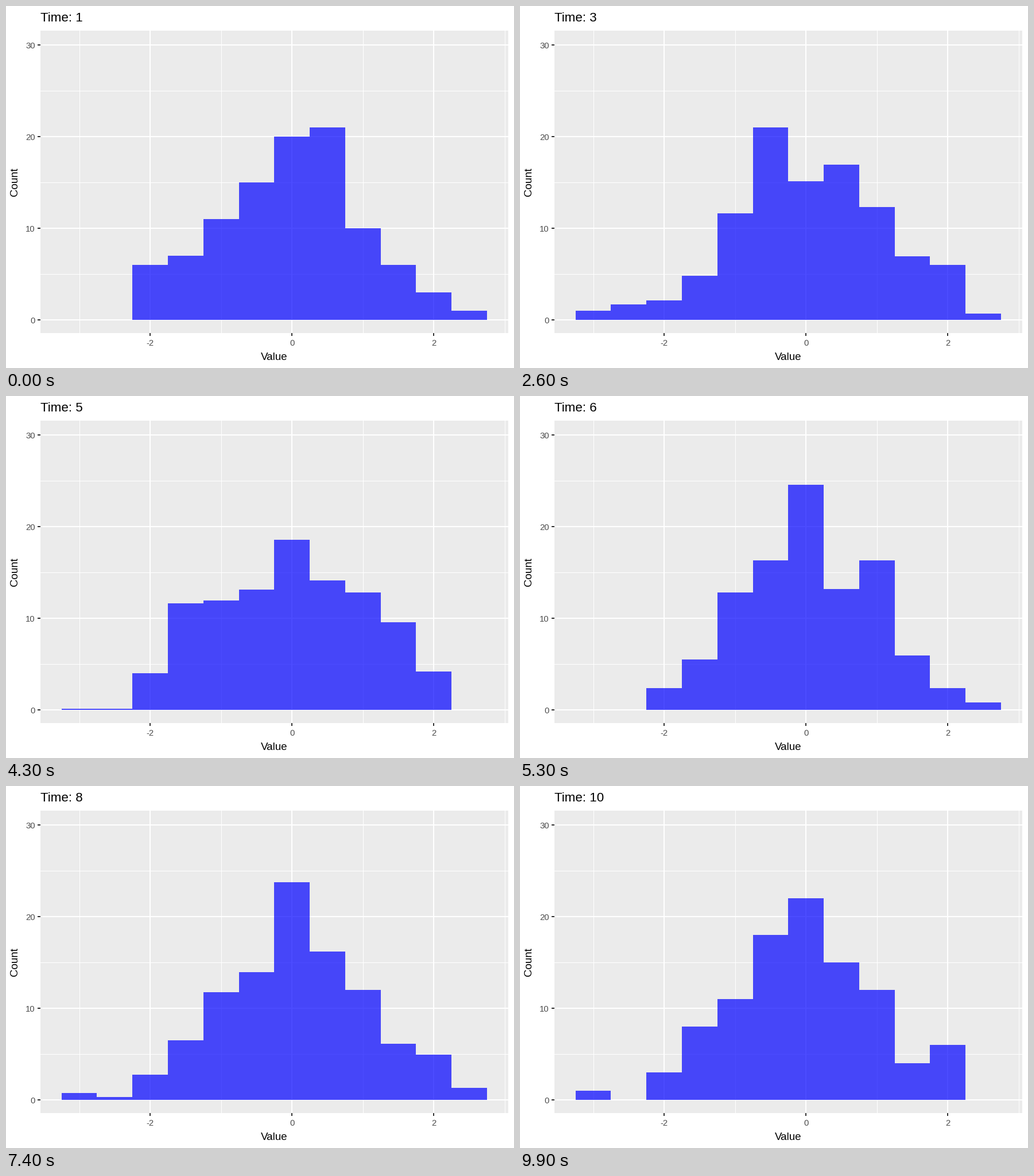
A matplotlib script that plays this animation: 885 by 632 pixels, repeating every 10000 ms.

```python
import numpy as np
import matplotlib.pyplot as plt
from matplotlib.animation import FuncAnimation
from matplotlib.patches import Rectangle

W, H, DPI = 885, 632, 64
LEFT, TOP, RIGHT, BOTTOM = 60, 43, 875, 571
STEPS = 11  # frames between two samples
FRAMES = 100

# Histogram counts at times 1..10, bins centred on -3, -2.5, ..., 2.5
COUNTS = np.array([
    [0, 0, 6, 7, 11, 15, 20, 21, 10, 6, 3, 1],
    [0, 1, 1, 6, 9, 20, 13, 21, 11, 12, 6, 0],
    [1, 2, 1, 3, 12, 25, 10, 18, 13, 8, 6, 1],
    [1, 1, 4, 8, 11, 14, 24, 15, 11, 5, 6, 0],
    [0, 0, 4, 12, 12, 13, 18, 14, 13, 10, 4, 0],
    [0, 0, 2, 4, 13, 17, 26, 13, 17, 5, 2, 1],
    [0, 1, 2, 5, 11, 19, 23, 14, 12, 9, 2, 2],
    [1, 0, 3, 7, 12, 12, 24, 17, 12, 5, 6, 1],
    [0, 1, 1, 4, 14, 13, 30, 12, 10, 9, 5, 1],
    [1, 0, 3, 8, 11, 18, 22, 15, 12, 4, 6, 0],
], dtype=float)

plt.rcParams["font.family"] = "Liberation Sans"
plt.rcParams["axes.unicode_minus"] = False

fig = plt.figure(figsize=(W / DPI, H / DPI), dpi=DPI, facecolor="white")
ax = fig.add_axes([0, 0, 1, 1])
ax.set_xlim(0, W)
ax.set_ylim(H, 0)
ax.axis("off")


def px(value):
    return 498.2 + 123.55 * value


def py(count):
    return 547.6 - 15.99 * count


def box(x0, y0, x1, y1, color, **kw):
    patch = Rectangle((x0, y0), x1 - x0, y1 - y0, facecolor=color,
                      linewidth=0, antialiased=False, **kw)
    return ax.add_patch(patch)


def label(x, y, text, size, color="black", **kw):
    return ax.text(x, y, text, fontsize=size * 72 / DPI, color=color,
                   va=kw.pop("va", "baseline"), **kw)


def vline(value, width):
    x = round(px(value)) - width // 2
    box(x, TOP, x + width, BOTTOM, "white")


def hline(count, width):
    y = round(py(count)) - width // 2
    box(LEFT, y, RIGHT, y + width, "white")


# Panel and grid
box(LEFT, TOP, RIGHT, BOTTOM, "#EBEBEB")
for v in (-3, -1, 1, 3):
    vline(v, 1)
for c in (5, 15, 25):
    hline(c, 1)
for v in (-2, 0, 2):
    vline(v, 2)
for c in (0, 10, 20, 30):
    hline(c, 2)

# Axes
for v in (-2, 0, 2):
    x = round(px(v))
    box(x - 1, BOTTOM, x + 1, BOTTOM + 5, "#333333")
    label(px(v), 593, str(v), 14.9, "#4D4D4D", ha="center")
for c in (0, 10, 20, 30):
    y = round(py(c))
    box(LEFT - 5, y - 1, LEFT, y + 1, "#333333")
    label(50.6, y + 5.5, str(c), 14.9, "#4D4D4D", ha="right")
label(467.6, 618, "Value", 18.7, ha="center")
label(24.5, 307.5, "Count", 18.7, ha="right", va="center",
      rotation=90, rotation_mode="default").set_horizontalalignment("right")
title = label(60, 27, "", 22.4, ha="left")

# Bars
BASE = round(py(0))
edges = [round(px(-3.25 + 0.5 * i)) for i in range(13)]
bars = [box(a, BASE, b, BASE, "blue", alpha=0.7)
        for a, b in zip(edges, edges[1:])]


def draw(frame):
    time = frame / STEPS
    k = min(frame // STEPS, len(COUNTS) - 2)
    heights = COUNTS[k] + (time - k) * (COUNTS[k + 1] - COUNTS[k])
    for bar, h in zip(bars, heights):
        top = round(py(h))
        bar.set_y(top)
        bar.set_height(BASE - top)
        bar.set_visible(top < BASE)
    title.set_text(f"Time: {int(time + 0.5) + 1}")
    return [*bars, title]


anim = FuncAnimation(fig, draw, frames=FRAMES, interval=100,
                     repeat=True, repeat_delay=0, blit=False)
plt.show()
```
